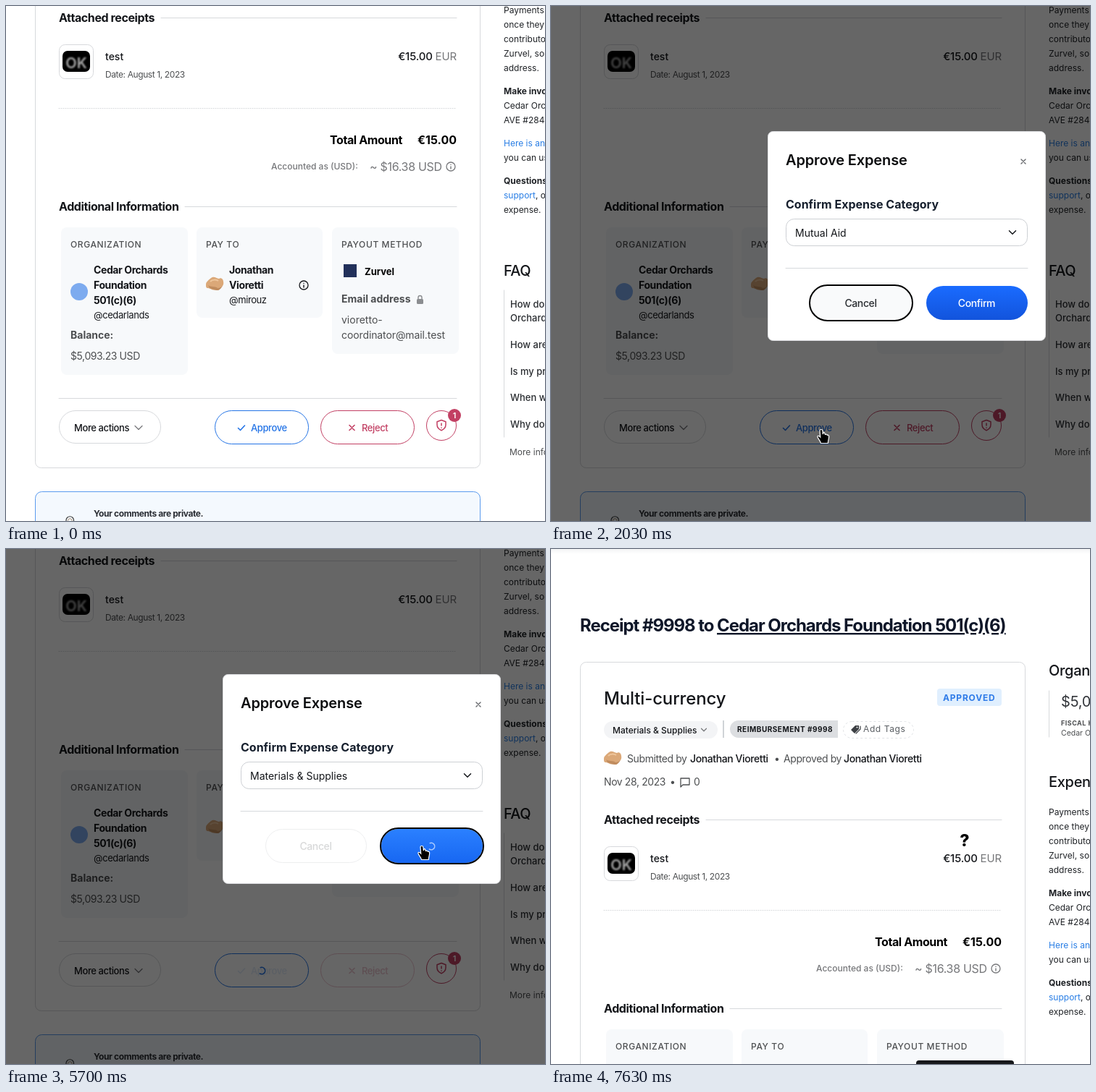
Recreate the animation shown at these times as an HTML page. Size 744x712 px, loop 8 s.

```html
<!DOCTYPE html>
<html lang="en">
<head>
<meta charset="utf-8">
<title>Approve expense</title>
<style>
  html, body { margin: 0; width: 100%; height: 100%; overflow: hidden; background: #fff; }
  svg { display: block; font-family: Inter, "Liberation Sans", sans-serif; }
  text { white-space: pre; }
  #menu { filter: drop-shadow(0 2px 3px rgba(0, 0, 0, .18)); }
</style>
</head>
<body>
<svg id="stage" width="744" height="712" viewBox="0 0 744 712">
  <defs>
    <linearGradient id="blue" x2="0" y2="1"><stop stop-color="#1a6bff"/><stop offset="1" stop-color="#1254dc"/></linearGradient>
    <linearGradient id="blueHover" x2="0" y2="1"><stop stop-color="#2b80ff"/><stop offset="1" stop-color="#1767f2"/></linearGradient>
    <linearGradient id="navShade" x2="0" y2="1"><stop stop-color="#f3f4f5"/><stop offset="1" stop-color="#fff"/></linearGradient>
    <filter id="soft"><feGaussianBlur stdDeviation=".8"/></filter>
  </defs>
  <g id="page"></g>
  <rect id="shade" width="744" height="712" fill="#000"/>
  <g id="modal"></g>
  <g id="menu"></g>
  <g id="toast"></g>
  <g id="cursor"></g>
</svg>
<script>
const LOOP = 8000;
const INK = '#14161a', DARK = '#4d4f51', GRAY = '#76777a', LINE = '#d7d9dc';
const BLUE = '#2474e6', RED = '#c23f63', LINK = '#297ee5';
const $ = id => document.getElementById(id);

// y is the middle of the capital letters
const text = (x, y, str, size, weight = 400, fill = INK, gap = 0, extra = '') =>
  `<text x="${x}" y="${Math.round(y + size * .364)}" font-size="${size}" font-weight="${weight}" fill="${fill}" letter-spacing="${gap}" ${extra}>${str}</text>`;
const endText = (...a) => text(...a, 'text-anchor="end"');
const midText = (x, y, str, size, weight, color, gap, extra = '') =>
  text(x, y, str, size, weight, color, gap, 'text-anchor="middle" ' + extra);
const box = (x, y, w, h, r, fill, stroke = 'none', extra = '') =>
  `<rect x="${x + .5}" y="${y + .5}" width="${w - 1}" height="${h - 1}" rx="${r}" fill="${fill}" stroke="${stroke}" ${extra}/>`;
const fill = (x, y, w, h, r, color, extra = '') =>
  `<rect x="${x}" y="${y}" width="${w}" height="${h}" rx="${r}" fill="${color}" ${extra}/>`;
const path = (d, color, width = 1, extra = '') =>
  `<path d="${d}" fill="none" stroke="${color}" stroke-width="${width}" stroke-linecap="round" stroke-linejoin="round" ${extra}/>`;
const disc = (x, y, r, color, stroke = 'none') =>
  `<circle cx="${x}" cy="${y}" r="${r}" fill="${color}" stroke="${stroke}"/>`;
const hline = (x, y, x2, extra = '') => path(`M${x} ${y + .5}H${x2}`, LINE, 1, extra);
const info = (x, y, color) =>
  path(`M${x} ${y}v3M${x} ${y - 2.8}v.2`, color, 1.4) +
  `<circle cx="${x}" cy="${y}" r="6" fill="none" stroke="${color}" stroke-width="1.3"/>`;
const spinner = (x, y, color) =>
  `<g transform="translate(${x} ${y})"><circle class="spin" r="4.7" fill="none" stroke="${color}" stroke-width="1.6" stroke-dasharray="20 9.5"/></g>`;
const chevron = (x, y, w, color, width) => path(`M${x - w} ${y - w / 2}l${w} ${w}l${w} ${-w}`, color, width);
const avatar = (x, y) => `<g transform="translate(${x} ${y})">
  <path d="M-12 1C-12-3-8-5-5-8C-1-11 2-8 6-7C9-9 12-6 12-3C13 1 11 4 8 5C7 9 4 10 1 8C-3 10-6 6-9 6C-12 6-12 4-12 1Z" fill="#dba878"/>
  <path d="M-9 2C-5 5 1 3 4 6C7 6 9 4 11 3C8 7 7 9 3 9C0 9-3 7-7 6Z" fill="#c08c5e"/>
  <path d="M-6-3C-3-6 2-6 5-4" fill="none" stroke="#efc79d" stroke-width="2"/></g>`;

function summary() {
  const underline = 'text-decoration="underline" style="text-underline-offset:4px;text-decoration-thickness:2px;text-decoration-skip-ink:none"';
  return fill(0, -358, 744, 7, 0, 'url(#navShade)') +
    text(40, -253, `Receipt #9998 to <tspan ${underline}>Cedar Orchards Foundation 501(c)(6)</tspan>`, 24, 700, '#0f1729', -1.05) +
    box(40, -202, 615, 841, 8, '#fff', LINE) +
    text(73, -152, 'Multi-currency', 24, 500, INK, -.15) +
    fill(533, -165, 89, 24, 4, '#e0effe') +
    text(541, -152, 'APPROVED', 12, 700, '#2f7be8', .8) +
    fill(73, -120, 157, 24, 12, '#f3f4f6') +
    text(85, -107, 'Materials &amp; Supplies', 12, 500) +
    chevron(211, -108, 3.5, GRAY, 1.2) +
    fill(237, -121, 2, 24, 0, '#d0d3d7') +
    '<path d="M259-121H396V-97H259A12 12 0 0 1 259-121Z" fill="#dcdee1"/>' +
    text(257, -109, 'REIMBURSEMENT #9998', 10, 700, INK, .5) +
    box(403, -120, 98, 24, 12, 'none', '#e1e3e6', 'stroke-dasharray="3 3"') +
    '<path d="M414-108l6-6h5v5l-6 6Z" fill="#3d4044"/>' + disc(422.5, -111.5, 1, '#fff') +
    path('M427-113v4l-6 6', '#3d4044', 1.2) +
    text(431, -109, 'Add Tags', 12, 400, '#5a5e63', .6) +
    avatar(85, -69) +
    text(105, -68, 'Submitted by', 14, 400, DARK, -.4) +
    text(192, -68, 'Jonathan Vioretti', 14, 500, INK, -.4) +
    text(308, -68, '•', 14, 400, DARK) +
    text(321, -68, 'Approved by', 14, 400, DARK, -.4) +
    text(404, -68, 'Jonathan Vioretti', 14, 500, INK, -.4) +
    text(73, -36, 'Nov 28, 2023', 14, 400, DARK, -.4) +
    text(164, -36, '•', 14, 400, DARK) +
    path('M179-41h12v9h-9l-3 3Z', DARK, 1.3) +
    text(197, -36, '0', 14, 400, DARK);
}

function receipts() {
  return text(73, 16, 'Attached receipts', 16, 700, INK, -.4) + hline(214, 16, 622) +
    box(73, 53, 48, 48, 8, '#fff', LINE) + fill(78, 62, 38, 29, 7, '#000') +
    midText(97, 79, 'OK', 20, 600, '#a9a9a9', 0, 'filter="url(#soft)"') +
    text(137, 70, 'test', 14, 500) +
    text(137, 95, 'Date: August 1, 2023', 12, 400, DARK, -.4) +
    endText(622, 70, `€15.00 <tspan font-weight="400" fill="${GRAY}">EUR</tspan>`, 15, 500, INK, -.15) +
    hline(73, 141, 622, 'stroke-dasharray="1 2"') +
    text(447, 185, 'Total Amount', 16, 700, '#000', -.4) +
    endText(622, 185, '€15.00', 16, 700, '#000', 0) +
    text(366, 222, 'Accounted as (USD):', 12, 500, GRAY) +
    text(502, 222, '~ $16.38 USD', 16, 400, GRAY, -.3) + info(614, 222, GRAY);
}

function details() {
  const card = (x, w, h, title) => fill(x, 306, w, h, 8, '#f7f9fb') + text(x + 13, 330, title, 12, 500, DARK, .6);
  const org = ['Cedar Orchards', 'Foundation', '501(c)(6)'];
  return text(73, 277, 'Additional Information', 16, 700, INK, -.4) + hline(247, 277, 622) +
    card(76, 175, 204, 'ORGANIZATION') + card(263, 174, 125, 'PAY TO') + card(450, 175, 175, 'PAYOUT METHOD') +
    disc(101, 395, 12, '#7dabef') +
    org.map((s, i) => text(121, 365 + 21 * i, s, 14, 700, INK, -.4)).join('') +
    text(121, 427, '@cedarlands', 13, 400, INK, -.4) +
    text(89, 455, 'Balance:', 14, 700, DARK) +
    text(89, 484, '$5,093.23 USD', 14, 400, DARK, -.4) +
    avatar(288, 384) +
    text(308, 365, 'Jonathan', 14, 700, INK, -.4) + text(308, 386, 'Vioretti', 14, 700, INK, -.4) +
    text(308, 406, '@mirouz', 13, 400, INK, -.4) + info(411, 386, INK) +
    fill(466, 357, 18, 18, 0, '#22305a') +
    text(495, 367, 'Zurvel', 13, 700, '#000') +
    text(463, 405, 'Email address', 14, 700, DARK) +
    fill(567, 405, 9, 7, 1.5, '#8b8d90') + path('M569 405v-2a2.4 2.4 0 0 1 5 0v2', '#8b8d90', 1.4) +
    text(463, 434, 'vioretto-', 14, 400, DARK) + text(463, 455, 'coordinator@mail.test', 14, 400, DARK, -.1);
}

function actions() {
  return hline(73, 542, 622) +
    box(73, 559, 141, 46, 22.5, '#fff', LINE) + text(94, 583, 'More actions', 13, 500, INK, -.4) +
    chevron(183, 583, 5, GRAY, 1.2) +
    box(288, 559, 130, 47, 23, '#fff', BLUE) +
    '<g id="approve">' + path('M320.5 583.5l3 3l6-6.5', BLUE, 1.6) + text(338, 583, 'Approve', 13, 500, BLUE, -.4) + '</g>' +
    '<g id="approveSpin">' + spinner(353, 583, BLUE) + '</g>' +
    '<g id="reject">' + box(434, 559, 130, 47, 23, '#fff', RED) +
    path('M474 579.5l7 7m0-7l-7 7', RED, 1.6) + text(491, 583, 'Reject', 13, 500, RED, -.4) + '</g>' +
    disc(601, 580, 20.5, '#fff', RED) +
    path('M601 572.5l6 2.3v4c0 4-2.5 6.5-6 8c-3.5-1.500-6-4-6-8v-4ZM601 577v3M601 583v.2', RED, 1.5) +
    disc(619, 566, 9, RED) + midText(619, 566, '1', 11, 600, '#fff', 0) +
    box(40, 671, 615, 80, 9, '#f4f9fe', '#5b9bee') +
    path('M83 714v-3a5 5 0 0 1 10.5 0v3', '#3a3a3a', 1.2) + path('M85.5 714v-2.5a2.8 2.8 0 0 1 5.6 0v2.5', '#a58a6e', 1) +
    text(121, 702, 'Your comments are private.', 12, 700, '#2a2d33', -.4);
}

function sidebar() {
  const notes = [[6, 'Payments will'], [26, 'once they are'], [46, 'contributors'], [66, 'Zurvel, so add'], [86, 'address.'],
    [118, 'Make invoices', 700], [138, 'Cedar Orchards'], [158, 'AVE #28465'], [190, 'Here is an example', 400, LINK],
    [210, 'you can use'], [242, 'Questions?', 700], [262, `<tspan fill="${LINK}">support</tspan>, or the`], [282, 'expense.']];
  const faq = [[412, 'How do I'], [431, 'Orchards?'], [468, 'How are'], [505, 'Is my private'], [541, 'When will'], [578, 'Why do I']];
  return text(687, -190, 'Organization', 20, 500, INK, -.3) + path('M687.5-162V-98', LINE) +
    text(704, -147, '$5,093.23', 20, 400, '#33363b', -.2) +
    text(704, -117, 'FISCAL HOST', 9, 700, DARK, .5) + text(704, -104, 'Cedar Orchards', 10.5, 400, DARK) +
    text(687, -36, 'Expense', 20, 500, INK, -.3) +
    notes.map(([y, s, w, c]) => text(687, y, s, 12, w, c || '#1f2226')).join('') +
    text(687, 366, 'FAQ', 20, 500, INK, -.6) + path('M687.5 393V596', LINE) +
    faq.map(([y, s]) => text(696, y, s, 13, 500, '#2a2d31')).join('') +
    text(695, 617, 'More info', 12, 400, DARK);
}

function dialog() {
  return box(299, 173, 384, 290, 7, '#fff', '#dcdde0') +
    text(324, 213, 'Approve Expense', 20, 600, '#0b0c0e', -.15) +
    path('M649 212l6 6m0-6l-6 6', '#66686c', 1.4) +
    text(324, 274, 'Confirm Expense Category', 16, 700, '#17202e') +
    box(324, 294, 334, 38, 11, '#fff', '#cdd0d4') +
    text(337, 314, '', 14, 400, INK, 0, 'id="choice"') + chevron(637, 313, 4.5, INK, 1.5) +
    hline(324, 362, 658) +
    '<g id="cancel">' + box(358, 387, 140, 47, 23, '#fff', '#d3d5d8') + '</g>' +
    fill(357, 386, 142, 49, 24.5, '#f9fafb', 'id="cancelFocus" stroke="#000" stroke-width="2"') +
    midText(427.5, 411, 'Cancel', 14, 500, '#2a2d31', -.4, 'id="cancelText"') +
    fill(518, 387, 140, 47, 23.5, 'url(#blue)', 'id="confirm"') +
    fill(517, 386, 142, 49, 24.5, 'none', 'id="confirmFocus" stroke="#000" stroke-width="2"') +
    midText(587.5, 411, 'Confirm', 14, 500, '#fff', -.4, 'id="confirmText"') +
    '<g id="confirmSpin">' + spinner(587, 411, '#a9caff') + '</g>';
}

function dropdown() {
  const items = ['Materials &amp; Supplies', 'Program Food &amp; Groceries', 'Program Transportation &amp; Travel',
    'Mutual Aid', 'Program Housing &amp; Lodging', 'Postage &amp; Shipping'];
  return box(331, 336, 320, 346, 6, '#fff', '#dfe1e4') +
    '<circle cx="351.5" cy="358" r="5.2" fill="none" stroke="#8f9297" stroke-width="1.4"/>' + path('M355.5 362l4 4', '#8f9297', 1.4) +
    path('M369 351v17', '#2a2d31', 1) +
    text(368, 360, 'Filter by name', 14, 400, GRAY) + hline(332, 381, 650) +
    fill(336, 386, 307, 40, 6, '#eef1f6') +
    fill(646, 384, 3, 79, 1.5, '#7f8186') +
    items.map((s, i) => text(348, 406 + 49 * i, s, 12, 400, '#2f3237', 0, 'class="item"')).join('');
}

const POINTERS = {
  none: '',
  arrow: '<path d="M0 0V16L3.7 12.5L6.5 18.7L9.3 17.5L6.5 11.5H11.5Z" fill="#000" stroke="#fff" stroke-width="1.2"/>',
  hand: '<path d="M-2 1C-2-1 1.5-1 1.8 1L2.3 6C4 0 5 6 5.5 6.5C7 5.5 8 6.5 8.3 7.3C10 6.8 10.8 8 10.6 10C10.5 13 9.5 14 9.3 18.5H-.5C-1 15.5-4 13-5 10C-5.5 8-3.5 7.5-1.3 10Z" fill="#000" stroke="#fff" stroke-width="1.2"/>',
  help: '<text y="9" text-anchor="middle" font-size="23" font-weight="800" fill="#000" stroke="#fff" stroke-width="2" paint-order="stroke">?</text>'
};

$('page').innerHTML = summary() + receipts() + details() + actions() + sidebar();
$('modal').innerHTML = dialog();
$('menu').innerHTML = dropdown();
$('toast').innerHTML = fill(504, 707, 135, 30, 4, '#17181b');

// [start ms, value]: each value holds until the next start
const SHADE = [[0, 0], [1570, .035], [1630, .22], [1700, .46], [1770, .6], [7230, 0]];
const MODAL = [[0, 0], [1430, .5], [1500, 1], [7230, 0]];
const MENU = [[0, 0], [3230, .15], [3300, .55], [3370, .9], [4370, 1], [4630, .75], [4700, .4], [4770, .1], [5030, 0]];
const SCROLL = [[0, 0], [7370, .1], [7430, .45], [7500, .78], [7570, .95], [7630, 1]];
const CURSOR = [[0, ['none', 0, 0]], [830, ['hand', 373, 586]], [3100, ['hand', 476, 307]], [4370, ['arrow', 460, 411]],
  [5030, ['hand', 574, 411]], [7230, ['arrow', 571, 402]], [7630, ['help', 571, 402]]];

const at = (steps, t) => steps.filter(s => s[0] <= t).pop()[1];
const show = (id, on) => $(id).setAttribute('visibility', on ? 'inherit' : 'hidden');
const fade = (id, a) => $(id).setAttribute('opacity', a);
const spins = document.querySelectorAll('.spin');
const items = document.querySelectorAll('.item');
let pointer = '';

function draw(t) {
  const busy = t >= 5570, picked = t >= 4570;
  $('page').setAttribute('transform', `translate(0 ${Math.round(358 * at(SCROLL, t))})`);
  fade('shade', at(SHADE, t));
  fade('modal', at(MODAL, t));

  const a = at(MENU, t);
  fade('menu', a);
  $('menu').setAttribute('transform', `translate(491 509) scale(${.95 + .05 * a}) translate(-491 -509)`);
  $('choice').textContent = picked ? 'Materials & Supplies' : 'Mutual Aid';
  items[0].setAttribute('font-weight', picked ? 600 : 400);
  items[3].setAttribute('font-weight', picked ? 400 : 600);

  show('cancelFocus', t < 3100);
  fade('cancel', busy ? .4 : 1);
  fade('cancelText', busy ? .18 : 1);
  $('confirm').setAttribute('fill', t >= 5030 ? 'url(#blueHover)' : 'url(#blue)');
  show('confirmFocus', busy);
  show('confirmText', !busy);
  show('confirmSpin', busy);
  show('approveSpin', busy);
  fade('approve', busy ? .12 : 1);
  fade('reject', busy ? .3 : 1);
  const turn = Math.floor((Math.min(Math.max(t, 5570), 6770) - 5570) / 66.6) * 30;
  spins.forEach(s => s.setAttribute('transform', `rotate(${turn - 150})`));

  show('toast', t >= 7630);
  const [kind, x, y] = at(CURSOR, t);
  if (kind !== pointer) $('cursor').innerHTML = POINTERS[pointer = kind];
  $('cursor').setAttribute('transform', `translate(${x} ${y})`);
}

function tick() {
  draw(performance.now() % LOOP);
  requestAnimationFrame(tick);
}
tick();
</script>
</body>
</html>
```
